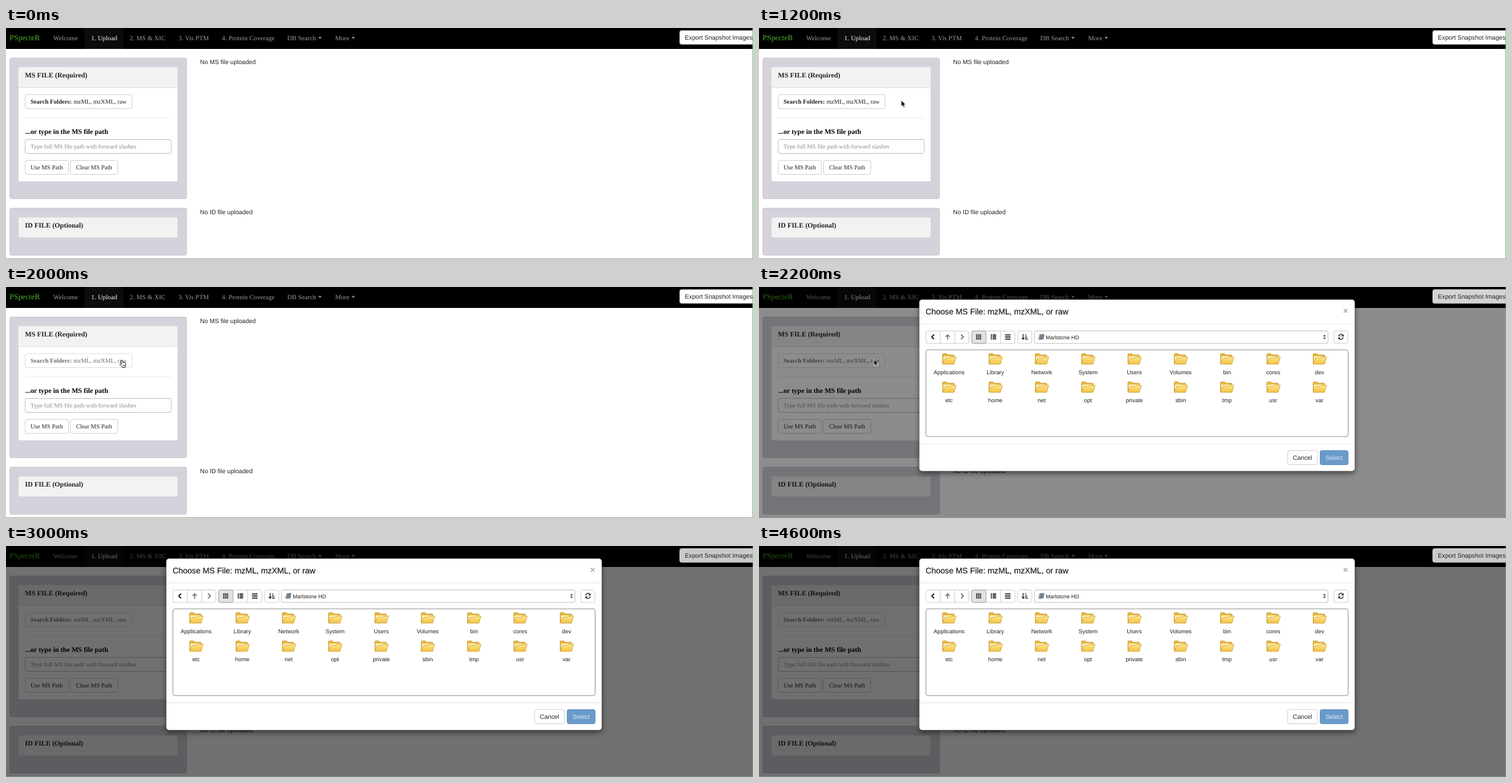
An HTML page that plays this animation: 1280x397 px, repeating every 4.8 s.

```html
<!DOCTYPE html>
<html lang="en">
<head>
<meta charset="utf-8">
<title>File upload</title>
<style>
  html, body { margin: 0; width: 100%; height: 100%; overflow: hidden; background: #fff; }
  svg { display: block; width: 1280px; height: 397px; }
  text { white-space: pre; text-rendering: geometricPrecision; }
  .sans { font-family: "Liberation Sans", Arial, sans-serif; }
  .serif { font-family: "Liberation Serif", "Times New Roman", serif; }
  .nav { letter-spacing: .1px; }
  .bold { font-weight: bold; }
  .medium { stroke: #222; stroke-width: .25px; }
  .mid { text-anchor: middle; }
</style>
</head>
<body>
<svg id="stage" viewBox="0 0 1280 397">
  <defs>
    <linearGradient id="flap" x1="0" y1="0" x2="0" y2="1">
      <stop offset="0" stop-color="#fde68c"/>
      <stop offset="1" stop-color="#f3c242"/>
    </linearGradient>
    <filter id="shade" x="-10%" y="-10%" width="120%" height="130%">
      <feDropShadow dx="0" dy="4" stdDeviation="5" flood-opacity=".5"/>
    </filter>
    <g id="folder" stroke-linejoin="round">
      <path d="M-11 8V-8q0-1.2 1.2-1.2h5.6l2 2.2H7.6q1.2 0 1.2 1.2V8z" fill="#e9b83c" stroke="#c08f2a" stroke-width=".8"/>
      <path d="M-9.5 5V-4.5H7.5V0z" fill="#fff3c4"/>
      <path d="M-11 8.8L-6.6-1.6H1l2-1.8h9.2L8.4 8.8z" fill="url(#flap)" stroke="#c99a30" stroke-width=".8"/>
    </g>
  </defs>
  <g id="page"></g>
  <rect id="veil" width="1280" height="397"/>
  <g id="bright"></g>
  <g id="edge" fill="none">
    <path d="M1279.5 0V397" stroke="#6fcb68"/>
    <path d="M0 396.5H1280" stroke="#93a892"/>
  </g>
  <g id="modal"></g>
  <path id="arrow" d="M0 0V10.6L2.5 8.4L4.3 12.3L6.1 11.5L4.4 7.7H7.8z" fill="#000" stroke="#fff" stroke-width=".9"/>
  <g id="hand" stroke="#000" stroke-width=".9" stroke-linejoin="round">
    <path d="M2.2 1Q3.6-.2 4.4 1.4L5.4 4.2Q6.5 3.4 7.2 4.5Q8.4 3.9 9 5Q10.2 4.8 10.4 6.2L10.7 8.6Q10.6 10.4 9.8 11.2V13H4.6V11.8L1 8.4Q-.2 7 1 6.4Q2 6.2 3.3 7.5z" fill="#fff"/>
    <path d="M5.9 8.3v2.6M7.5 8.3v2.6M9 8.3v2.6" stroke-width=".6"/>
  </g>
</svg>
<script>
const $ = id => document.getElementById(id);

function add(parent, tag, attrs, text) {
  const el = document.createElementNS('http://www.w3.org/2000/svg', tag);
  for (const k in attrs) el.setAttribute(k, attrs[k]);
  if (text) el.textContent = text;
  parent.appendChild(el);
  return el;
}
const label = (p, text, x, y, size, cls, fill = '#222') =>
  add(p, 'text', { x, y, 'font-size': size, class: cls, fill }, text);
const box = (p, x, y, width, height, fill = '#fff', stroke = '#ccc', rx = 3) =>
  add(p, 'rect', { x, y, width, height, fill, stroke, rx });
const line = (p, d, stroke, width = 1) =>
  add(p, 'path', { d, stroke, 'stroke-width': width, fill: 'none' });
const shape = (p, d, fill) => add(p, 'path', { d, fill });

// Page
const page = $('page');
add(page, 'rect', { width: 1280, height: 36, fill: '#000' });
add(page, 'rect', { x: 134.5, width: 66.5, height: 36, fill: '#0c0c0c' });
label(page, 'PSpecteR', 6, 21, 13.4, 'serif', '#4bb02c');
[['Welcome', 81], ['1. Upload', 146], ['2. MS & XIC', 212], ['3. Vis PTM', 295.5],
 ['4. Protein Coverage', 370], ['DB Search', 482], ['More', 564]]
  .forEach(([name, x], i) => label(page, name, x, 20.5, 11.1, 'serif nav', i === 1 ? '#fff' : '#9d9d9d'));
for (const x of [535, 592]) shape(page, `M${x} 15.5h6l-3 3.2z`, '#9d9d9d');

const well = (y, h) => box(page, 6.5, y, 303, h, '#d5d2db', '#cbc8d1');
well(51.5, 242);
box(page, 21, 67, 273.5, 197, '#fff', '#d3d1d6');
shape(page, 'M21.5 102V69.5q0-2 2-2H292q2 0 2 2V102z', '#f2f2f2');
line(page, 'M21 102.5H294.5', '#ddd');
label(page, 'MS FILE (Required)', 32.5, 84.5, 11.9, 'serif bold');

const search = add(page, 'g', {});
const ring = box(search, 31, 112.5, 187, 28, 'none', '#9ec3ee', 4);
ring.setAttribute('stroke-width', 2.5);
const face = box(search, 33, 114.5, 183, 24);
label(search, 'Search Folders:', 42, 130, 10.5, 'serif bold');
label(search, 'mzML, mzXML, raw', 115.7, 130, 10.5, 'serif');

line(page, 'M33 154.5H283', '#e9e9e9');
label(page, '...or type in the MS file path', 33, 182, 11.9, 'serif bold', '#000');
box(page, 33, 191.5, 250, 24, '#fff', '#bbb');
label(page, 'Type full MS file path with forward slashes', 42, 206.8, 10.42, 'serif', '#8a8a8a');
box(page, 33, 227.5, 74, 24);
label(page, 'Use MS Path', 42, 243, 10.5, 'serif');
box(page, 110.5, 227.5, 81, 24);
label(page, 'Clear MS Path', 120, 243, 10.5, 'serif');

well(309.5, 81);
box(page, 21, 325, 273.5, 35.5, '#f2f2f2', '#d3d1d6');
label(page, 'ID FILE (Optional)', 32.5, 342.5, 11.9, 'serif bold');
label(page, 'No MS file uploaded', 332.5, 62, 10.6, 'sans');
label(page, 'No ID file uploaded', 332.5, 320, 10.6, 'sans');

// Button that stays brighter than the dimmed page
const exportFace = box($('bright'), 1154.5, 4.5, 134, 23.5);
label($('bright'), 'Export Snapshot Images', 1163.3, 20, 10.6, 'sans');

// Dialog
const modal = $('modal');
const sheet = box(modal, 274.5, 21.5, 746.5, 295, '#fff', '#00000055', 5);
sheet.setAttribute('filter', 'url(#shade)');
label(modal, 'Choose MS File: mzML, mzXML, or raw', 285.5, 47, 13.85, 'sans medium');
label(modal, '×', 1005.2, 45.8, 15, 'sans bold mid', '#aaa');
for (const y of [63.5, 269.5]) line(modal, `M275 ${y}H1020.5`, '#e5e5e5');

box(modal, 286, 75.5, 73.5, 21.5);
line(modal, 'M310.5 75.5V97M335.5 75.5V97', '#ccc');
box(modal, 364.5, 75.5, 74, 21.5);
box(modal, 364.5, 75.5, 24.5, 21.5, '#e2e2e2', '#9c9c9c');
line(modal, 'M414 75.5V97', '#ccc');
box(modal, 443.5, 75.5, 24, 21.5);
box(modal, 472, 75.5, 503, 21.5, '#fff', '#bbb');
box(modal, 985, 75.5, 24, 21.5);

line(modal, 'M300 81.8L296 85.8L300 89.8', '#222', 2);
line(modal, 'M346.2 81.8L350.2 85.8L346.2 89.8', '#777', 2);
line(modal, 'M323.2 90.5V82.5M319.8 85.6L323.2 82.2L326.6 85.6', '#777', 1.8);
for (let r = 0; r < 3; r++) {
  const y = 81.5 + r * 3.2;
  for (let c = 0; c < 3; c++) shape(modal, `M${372 + c * 3.2} ${y}h2.4v2.2h-2.4z`, '#222');
  shape(modal, `M397 ${y}h2.2v2.2h-2.2zM400.4 ${y}h6v2.2h-6z`, '#222');
}
line(modal, 'M421.5 82H431M421.5 84.7H431M421.5 87.4H431M421.5 90H431', '#222', 1.4);
line(modal, 'M452.6 80.8V89.5M450.4 87.5L452.6 89.9L454.8 87.5', '#222', 1.4);
line(modal, 'M456 82.3H458M456 84.9H459M456 87.4H460M456 89.9H461', '#222', 1.3);
line(modal, 'M993.3 84.8A4 4 0 0 1 1000.3 82.8M1001.1 86.6A4 4 0 0 1 994.1 88.6', '#222', 1.5);
shape(modal, 'M1001.7 81V85H997.7zM992.7 90.5V86.5H996.7z', '#222');
shape(modal, 'M480.5 81.5L489 80.8L487.5 90L478.3 91z', '#72808e');
shape(modal, 'M480.5 81.5L482 81.4L480 90.8L478.3 91z', '#a9b3bc');
label(modal, 'Marlstone HD', 491.3, 90, 9.4, 'sans');
shape(modal, 'M966.8 85L969 82L971.2 85zM966.8 87L969 90L971.2 87z', '#333');

box(modal, 286, 108, 723.5, 149, '#fff', '#888', 3.5);
['Applications Library Network System Users Volumes bin cores dev',
 'etc home net opt private sbin tmp usr var'].forEach((row, r) =>
  row.split(' ').forEach((name, c) => {
    const x = 325.7 + c * 79.35, y = 123.8 + r * 48.5;
    add(modal, 'use', { href: '#folder', x, y });
    label(modal, name, x, y + 26, 9.8, 'sans mid');
  }));

box(modal, 906, 281, 51, 24.5);
label(modal, 'Cancel', 931.3, 297, 10.6, 'sans mid');
box(modal, 961.5, 281, 48, 24.5, '#699aca', '#6291c0');
label(modal, 'Select', 985.4, 297, 10.6, 'sans mid', '#e1ebf5');

// Steps: start time, value
const pointer = [
  [0, null], [600, ['arrow', 533.5, 185]], [800, ['arrow', 345, 135.5]],
  [1000, ['arrow', 331, 131.5]], [1200, ['arrow', 243.8, 124.3]],
  [1400, ['arrow', 220, 128]], [1600, ['hand', 202, 126]],
  [1800, ['hand', 194.5, 125.3]], [2200, ['arrow', 197, 124.5]], [2600, null]
];
const button = [[0, 'idle'], [1600, 'hover'], [1800, 'press'], [2000, 'off']];
const dim = [[0, 0], [2200, .45], [2400, .56]];
const faces = {
  idle: ['#fff', '#ccc'], hover: ['#e6e6e6', '#adadad'],
  press: ['#dcdcdc', '#a0a0a0'], off: ['#fff', '#ccc']
};

const at = (steps, t) => steps.filter(s => s[0] <= t).pop()[1];
const show = (el, on) => { el.style.display = on ? '' : 'none'; };

function draw(t) {
  const p = at(pointer, t);
  for (const id of ['arrow', 'hand']) {
    const on = p !== null && p[0] === id;
    show($(id), on);
    if (on) $(id).setAttribute('transform', `translate(${p[1]} ${p[2]})`);
  }
  const state = at(button, t), [fill, stroke] = faces[state];
  face.setAttribute('fill', fill);
  face.setAttribute('stroke', stroke);
  search.setAttribute('opacity', state === 'off' ? .65 : 1);
  show(ring, state === 'press');

  const k = at(dim, t);
  $('veil').setAttribute('fill-opacity', k);
  const g = Math.round(255 - k * 95);
  exportFace.setAttribute('fill', `rgb(${g},${g},${g})`);
  $('edge').setAttribute('opacity', 1 - k * .8);
  show(modal, k > 0);
}

const start = performance.now();
function tick() {
  draw((performance.now() - start) % 4800);
  requestAnimationFrame(tick);
}
tick();
</script>
</body>
</html>
```
